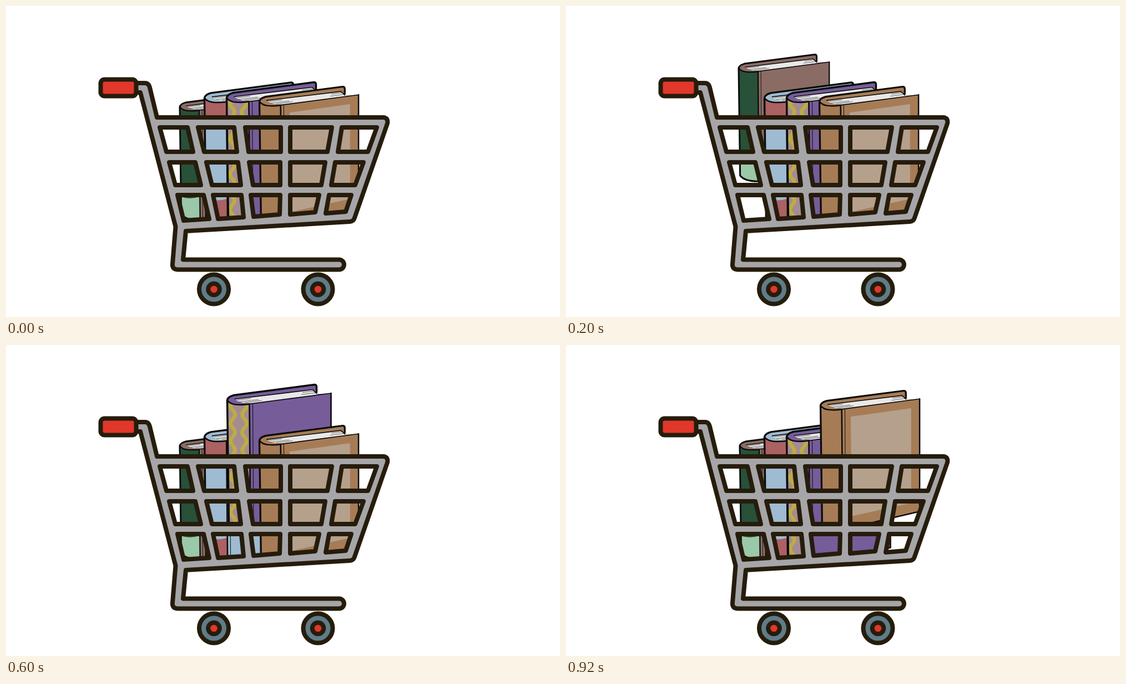
An HTML page that plays this animation: 998 px wide and 561 px high, repeating every 1 s.

```html
<!DOCTYPE html>
<html lang="en">
<head>
<meta charset="utf-8">
<title>Book cart</title>
<style>
  html, body { margin: 0; width: 100%; height: 100%; overflow: hidden; background: #fff; }
  svg { display: block; width: 100%; height: 100%; }

  /* Each book pops up for one fifth of the loop, then drops back. */
  .book { animation: lift 1s step-end infinite; animation-delay: var(--delay); }
  @keyframes lift {
    0% { translate: 0 0; }
    20%, 100% { translate: var(--down); }
  }
  .green  { --cover: #8a6c65; --spine: #275138; --down: 2px 70px;  --delay: -.8s; }
  .blue   { --cover: #9fbbd1; --spine: #9fbbd1; --down: -1px 91px; --delay: -.6s; }
  .purple { --cover: #765d99; --spine: #a58c92; --down: -1px 66px; --delay: -.4s; }
  .brown  { --cover: #a67c56; --spine: #a67c56; --down: -2px 63px; --delay: -.2s; }

  .cover { fill: var(--cover); }
  .spine { fill: var(--spine); }
  .ink { fill: none; stroke: #0b0a0a; stroke-linejoin: round; stroke-linecap: round; }
  .gold { fill: none; stroke: #bdac42; stroke-width: 6.5; }
  .cart { stroke: #261c0c; stroke-width: 8; stroke-linejoin: round; }
</style>
</head>
<body>
<svg viewBox="0 0 998 561" preserveAspectRatio="none">
  <defs>
    <path id="spine" d="M0 28Q5 35 16 36Q30 37 40 35L42 262Q12 262 3 250Z"/>
    <clipPath id="inSpine"><use href="#spine"/></clipPath>

    <g id="body">
      <path class="cover" d="M0 28Q1 22 12 19L157 0Q161 0 161 4V17L187 15.500V228L42 262Q12 262 3 250Z"/>
      <path fill="#e9e8e8" d="M14 26L154 9L163 18L46 33Q22 35 14 26Z"/>
      <use href="#spine" class="spine"/>
    </g>

    <g id="lines" class="ink">
      <path stroke-width="3.4" d="M40 262Q12 262 3 250L0 28Q1 22 12 19L157 0Q161 0 161 4V14"/>
      <path stroke-width="2.6" d="M0 28Q5 35 16 36Q30 37 40 35M187 15.500V228L42 262M40 35L42 262"/>
      <path stroke-width="1.7" d="M40 35L187 15.500M14 26L154 9L161 16"/>
      <path stroke-width="1" d="M46 35L47.500 260"/>
      <path stroke-width=".6" d="M18 28L42 25M22 31L56 27M32 32.500L62 28.500M136 14L157 11.500M134 18L160 14.500"/>
    </g>

    <path id="wave" d="M0 30q-8 8 0 16t0 16t0 16t0 16t0 16t0 16t0 16t0 16t0 16t0 16t0 16t0 16t0 16t0 16t0 16"/>

    <g id="wheel" class="cart">
      <circle r="26.500" fill="#5f7c89"/>
      <circle r="10.300" fill="#e2372b"/>
    </g>
  </defs>

  <g class="book green">
    <g transform="translate(311 87.5) scale(.873)">
      <use href="#body"/>
      <path clip-path="url(#inSpine)" fill="#9bc8a8" d="M0 213Q20 221 42 213V264H0Z"/>
      <use href="#lines"/>
    </g>
  </g>

  <g class="book blue">
    <g transform="translate(358.5 47) scale(.993)">
      <use href="#body"/>
      <path clip-path="url(#inSpine)" fill="#ac6163" d="M0 26H42V83Q18 86 0 77ZM0 208Q20 218 42 211V264H0Z"/>
      <use href="#lines"/>
    </g>
  </g>

  <g class="book purple">
    <g transform="translate(398.5 71.5)">
      <use href="#body"/>
      <g clip-path="url(#inSpine)" class="gold">
        <use href="#wave" x="10"/>
        <use href="#wave" transform="translate(31) scale(-1 1)"/>
      </g>
      <use href="#lines"/>
    </g>
  </g>

  <g class="book brown">
    <g transform="translate(458.5 82.5) scale(.955)">
      <use href="#body"/>
      <path fill="#b5a08c" d="M57 49L171 33V212L59 237Z"/>
      <use href="#lines"/>
    </g>
  </g>

  <path class="cart" fill="#a6a6a8" fill-rule="evenodd" d="
    M232 139H250Q257 139 259 147L272 201H680Q689 202 687 212L628 382Q626 389 619 389L324 406L319 457.500H600A9 9 0 0 1 600 475.500H309Q299 475 300 465L305.500 398L242 156H232Z
    M277 219H327L337 263H289Z M346 219H411L416 263H357Z M431 219H495V263H437Z M512 219H587L579 263H512Z M605 219H668L652 263H598Z
    M294 282H341L351 323H305Z M361 282H418L423 323H371Z M438 282H494V323H445Z M512 282H575L568 323H512Z M593 282H644L629 323H586Z
    M309 341H356L366 384L320 387Z M373 341H424L428 381L382 384Z M441 341H494L493 376L446 380Z M512 341H564L557 372L512 376Z M582 341H622L612 371L576 374Z"/>
  <rect class="cart" x="170.500" y="132.500" width="64" height="30" rx="7" fill="#e2372b"/>
  <use href="#wheel" x="374.500" y="511"/>
  <use href="#wheel" x="562" y="511"/>
</svg>
</body>
</html>
```
